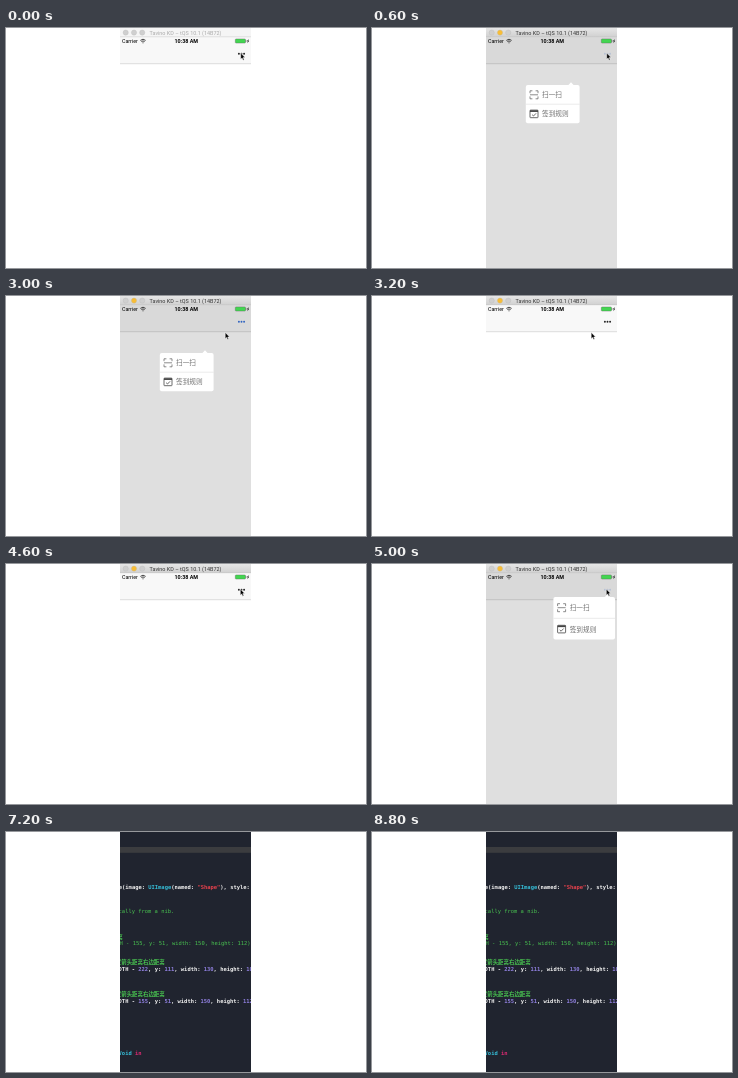
These frames come from a looping animation (360x240 px, 9200 ms). An HTML page:

```html
<!DOCTYPE html>
<html lang="zh">
<head>
<meta charset="utf-8">
<title>Popup menu demo</title>
<style>
  html, body { margin: 0; width: 100%; height: 100%; overflow: hidden; background: #fff; }
  svg { display: block; }
  text { white-space: pre; }
  .ui { font-family: Roboto, Inter, sans-serif; }
  .menu text { font: 6.7px "Noto Sans CJK SC", "Noto Sans CJK", sans-serif; fill: #707070; }
  .code text { font: 5.45px "DejaVu Sans Mono", "Noto Sans CJK SC", "Noto Sans CJK", monospace; }
  .code .b { font-weight: bold; }
</style>
</head>
<body>
<svg width="360" height="240" viewBox="0 0 360 240">
  <defs>
    <linearGradient id="bar" x2="0" y2="1">
      <stop stop-color="#e6e6e6"/><stop offset="1" stop-color="#d0d0d0"/>
    </linearGradient>
    <g id="scan" fill="none" stroke="#666" stroke-width=".75">
      <path d="M-4-1.6V-4H-1.6M1.6-4H4V-1.6M4 1.6V4H1.6M-1.6 4H-4V1.6M-4 0H4"/>
    </g>
    <g id="rules" fill="none" stroke="#444" stroke-width=".8">
      <rect x="-4" y="-3.7" width="8" height="7.6" rx=".6"/>
      <path d="M-4-2.7H4" stroke-width="1.7"/>
      <path d="M-1.9.9-.5 2.2 2.1-.5"/>
    </g>
  </defs>

  <svg x="114" width="131" height="240" viewBox="114 0 131 240">
    <g id="phone" class="ui">
      <rect x="114" y="9" width="131" height="27" fill="#f8f8f8"/>
      <path d="M114 35.7H245" stroke="#c9c9c9" stroke-width=".6"/>
      <rect id="shade" x="114" y="9" width="131" height="231" fill-opacity=".125"/>

      <rect id="title" x="114" width="131" height="9"/>
      <path d="M114 8.8H245" stroke="#bdbdbd" stroke-width=".4"/>
      <g stroke="#b4b4b4" stroke-width=".3" fill="#cfcfcf">
        <circle cx="119.7" cy="4.6" r="2.6"/>
        <circle id="yellow" cx="128" cy="4.6" r="2.6"/>
        <circle cx="136.2" cy="4.6" r="2.6"/>
      </g>
      <text id="name" x="179.5" y="6.6" font-size="5.45" text-anchor="middle">Tavino KD – tQS 10.1 (14B72)</text>

      <text x="116" y="15" font-size="5.3">Carrier</text>
      <g fill="none" stroke="#111" stroke-width=".8">
        <path d="M134.4 12.4Q137 10 139.6 12.4M135.4 13.6Q137 12.2 138.6 13.6"/>
        <path d="M136.5 14.8h1"/>
      </g>
      <text x="180.3" y="15" font-size="5.4" font-weight="700" text-anchor="middle">10:38 AM</text>
      <rect x="229.3" y="10.9" width="10.2" height="4.2" rx=".8" fill="#43d551" stroke="#555" stroke-width=".35"/>
      <path d="M240 12.2v1.6" stroke="#555" stroke-width=".6"/>
      <path d="M242.6 10.9 241 13.3h.9l-.5 2 1.7-2.6h-.9z"/>

      <g id="dots">
        <circle cx="232.9" cy="25.7" r=".95"/>
        <circle cx="235.5" cy="25.7" r=".95"/>
        <circle cx="238.1" cy="25.7" r=".95"/>
      </g>

      <g id="menuA" class="menu">
        <path d="M196 57.5 199 54.3 202 57.5" fill="#fff"/>
        <rect x="153.8" y="57" width="53.8" height="38.2" rx="2" fill="#fff"/>
        <path d="M154 76.2H207.5" stroke="#d4d4d4" stroke-width=".5"/>
        <use href="#scan" x="162" y="66.8"/>
        <use href="#rules" x="162" y="85.8"/>
        <text x="170" y="69.3">扫一扫</text>
        <text x="170" y="88.3">签到规则</text>
      </g>
      <g id="menuB" class="menu">
        <path d="M232.4 33.5 235.4 30.3 238.4 33.5" fill="#fff"/>
        <rect x="181.4" y="33" width="61.6" height="42.6" rx="2" fill="#fff"/>
        <path d="M181.6 54.3H243" stroke="#d4d4d4" stroke-width=".5"/>
        <use href="#scan" x="189.6" y="43.7"/>
        <use href="#rules" x="189.6" y="65"/>
        <text x="197.7" y="46.2">扫一扫</text>
        <text x="197.7" y="67.5">签到规则</text>
      </g>
      <path id="cursor" d="M0 0V6.3L1.4 5 2.4 7.2 3.5 6.7 2.5 4.6H4.4Z" stroke="#fff" stroke-width=".5"/>
    </g>

    <g id="editor" class="code">
      <rect x="114" width="131" height="240" fill="#20242f"/>
      <rect x="114" y="15" width="131" height="5.8" fill="#3b3c3f"/>
    </g>
  </svg>
</svg>
<script>
const LOOP = 9200, STEP = 200;
const $ = id => document.getElementById(id);
const set = (id, attrs) => {
  for (const k in attrs) $(id).setAttribute(k, attrs[k]);
};
const show = (id, on) => set(id, { visibility: on ? "visible" : "hidden" });

// Editor text
const W = "#f0f0f0", G = "#48c250", C = "#35bcd6", R = "#e5414c", P = "#9080e0", K = "#dc2a72";

function line(x, y, bold, ...parts) {
  const make = tag => document.createElementNS("http://www.w3.org/2000/svg", tag);
  const text = make("text");
  text.setAttribute("x", x);
  text.setAttribute("y", y);
  if (bold) text.setAttribute("class", "b");
  for (const [color, str] of parts) {
    const span = make("tspan");
    span.setAttribute("fill", color);
    span.textContent = str;
    text.append(span);
  }
  $("editor").append(text);
}

const frameArgs = (y, left, top, w, h) => line(112.6, y, true,
  [W, "DTH - "], [P, left], [W, ", y: "], [P, top],
  [W, ", width: "], [P, w], [W, ", height: "], [P, h], [W, ")"]);

line(112.8, 57, true, [W, "e(image: "], [C, "UIImage"], [W, "(named: "], [R, '"Shape"'], [W, "), style:"]);
line(112.6, 81, false, [G, "cally from a nib."]);
line(111.2, 106.6, true, [G, "离"]);
line(107, 113, false, [G, "DTH - 155, y: 51, width: 150, height: 112)"]);
line(109.8, 132.4, true, [G, "定箭头距离右边距离"]);
frameArgs(139, "222", "111", "130", "102");
line(109.8, 164.4, true, [G, "定箭头距离右边距离"]);
frameArgs(171, "155", "51", "150", "112");
line(112.6, 223, true, [C, "Void "], [K, "in"]);

// Pointer stops: time, x, y
const path = [
  [0, 234.7, 25], [2200, 234.7, 25], [2800, 219.2, 36.4], [3600, 219.2, 36.4],
  [4000, 222, 39.5], [4600, 234.3, 25], [LOOP, 234.3, 25]
];

function pointer(t) {
  const i = path.findIndex(p => p[0] > t);
  const [t0, x0, y0] = path[i - 1], [t1, x1, y1] = path[i];
  const u = (t - t0) / (t1 - t0), e = u * u * (3 - 2 * u);
  return `translate(${x0 + (x1 - x0) * e} ${y0 + (y1 - y0) * e})`;
}

function draw(time) {
  const t = Math.floor(time % LOOP / STEP) * STEP;
  const active = t >= 200, code = t >= 6800;
  const a = t >= 400 && t < 3200, b = t >= 5000 && t < 6400;
  const pressed = a && t < 800 || b && t < 5400;

  show("phone", !code);
  show("editor", code);
  set("menuA", { display: a ? "inline" : "none" });
  set("menuB", { display: b ? "inline" : "none" });
  set("shade", { display: a || b ? "inline" : "none" });
  set("title", { fill: active ? "url(#bar)" : "#f5f5f5" });
  set("yellow", { fill: active ? "#f8bd35" : "#cfcfcf" });
  set("name", { fill: active ? "#333" : "#aaa" });
  set("dots", { fill: a || b ? "#2f63c0" : "#222", opacity: pressed ? 0.2 : 1 });
  set("cursor", { transform: pointer(t) });
}

function tick() {
  draw(performance.now());
  requestAnimationFrame(tick);
}
tick();
</script>
</body>
</html>
```
